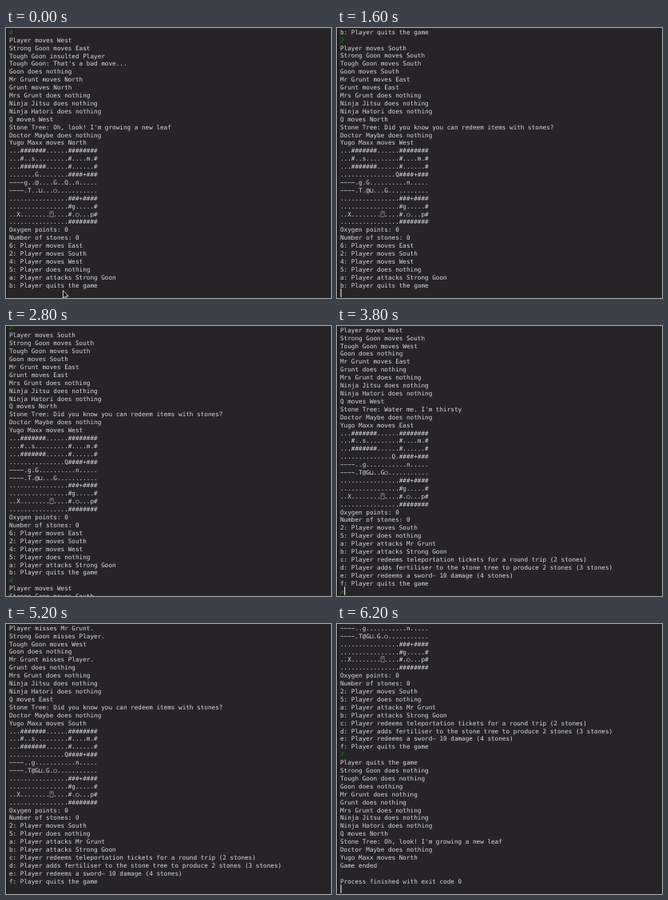
An HTML page that plays this animation: 407x338 px, repeating every 6.6 s.

```html
<!DOCTYPE html>
<html lang="en">
<head>
<meta charset="utf-8">
<title>Console game</title>
<style>
  html, body { margin: 0; width: 100%; height: 100%; overflow: hidden; background: #262427; }
  svg { display: block; }
  text {
    font: 7.66px "DejaVu Sans Mono", monospace;
    text-rendering: geometricPrecision;
    white-space: pre;
    fill: #dadada;
  }
  .input { fill: #06900c; font-style: italic; }
</style>
</head>
<body>
<svg width="407" height="338" viewBox="0 0 407 338">
  <rect width="1.4" height="338" fill="#151416"/>
  <g id="log"></g>
  <rect id="caret" width="1.2" height="10.6" fill="#d8d8d8"/>
  <path id="mouse" d="M71.5 328.6v9.4l2.1-1.9 1.6 3.4 1.5-.7-1.5-3.3h2.8z"
        fill="#0c0c0c" stroke="#e4e4e4" stroke-width=".9"/>
</svg>
<script>
const LOOP = 6600, LINE = 9.903, CHAR = 4.612, LEFT = 4, BASE = 7.8;
const LAST_ROW = 33; // screen row of the prompt
const GLIDE = 1.34;  // rows moved when a long output starts scrolling
const $ = id => document.getElementById(id);

const names = ['Player', 'Strong Goon', 'Tough Goon', 'Goon', 'Mr Grunt', 'Grunt', 'Mrs Grunt',
  'Ninja Jitsu', 'Ninja Hatori', 'Q', 'Stone Tree', 'Doctor Maybe', 'Yugo Maxx'];
const verbs = { N: ' moves North', S: ' moves South', E: ' moves East', W: ' moves West', '-': ' does nothing' };
const leaf = ": Oh, look! I'm growing a new leaf";
const redeem = ': Did you know you can redeem items with stones?';

// One entry per character: a key of verbs or the literal rest of the line.
const actions = list => list.map((a, i) => names[i] + (verbs[a] || a));

const map = (gate, water, pool) => [
  '...#######......########',
  '...#..s.........#....m.#',
  '...#######......#......#',
  gate + '####+###',
  '~~~~' + water,
  '~~~~' + pool,
  '................###+####',
  '................#g.....#',
  '..X........⍞....#.○...p#',
  '................########',
  'Oxygen points: 0',
  'Number of stones: 0'
];

const menu = list => list.map(s => s.replace(':', ': Player'));
const walkMenu = menu(['6: moves East', '2: moves South', '4: moves West', '5: does nothing',
  'a: attacks Strong Goon', 'b: quits the game']);
const fightMenu = menu(['2: moves South', '5: does nothing', 'a: attacks Mr Grunt', 'b: attacks Strong Goon',
  'c: redeems teleportation tickets for a round trip (2 stones)',
  'd: adds fertiliser to the stone tree to produce 2 stones (3 stones)',
  'e: redeems a sword– 10 damage (4 stones)', 'f: quits the game']);

const first = actions(['W', 'E', ' insulted Player', '-', 'N', 'N', '-', '-', '-', 'W', leaf, '-', 'N']);
first.splice(3, 0, "Tough Goon: That's a bad move...");

const lines = [
  '4', ...first,
  ...map('.......G........', 'g..@....G..Q..n.....', '.T..⊔...○...........'), ...walkMenu,
  '2', ...actions(['S', 'S', 'S', 'S', 'E', 'E', '-', '-', '-', 'N', redeem, '-', 'W']),
  ...map('...............Q', '.g.G..........n.....', '.T.@⊔...G...........'), ...walkMenu,
  '4', ...actions(['W', 'S', 'W', '-', 'E', '-', '-', '-', '-', 'W', ": Water me. I'm thirsty", '-', 'E']),
  ...map('..............Q.', '..g...........n.....', '.T@G⊔..G○...........'), ...fightMenu,
  'a', ...actions([' misses Mr Grunt.', ' misses Player.', 'W', '-', ' misses Player.', '-', '-', '-', '-',
    'E', redeem, '-', 'S']),
  ...map('...............Q', '..g...........n.....', '.T@G⊔.G.○...........'), ...fightMenu,
  'f', ...actions([' quits the game', '-', '-', '-', '-', '-', '-', '-', '-', 'N', leaf, '-', 'N']),
  'Game ended', '', 'Process finished with exit code 0'
];

const isInput = s => s.length === 1;
const prompts = lines.map((s, i) => isInput(s) ? i : 0).filter(Boolean).concat(lines.length);

const rows = lines.map((s, i) => {
  const row = document.createElementNS('http://www.w3.org/2000/svg', 'text');
  row.textContent = s;
  row.setAttribute('x', LEFT);
  row.setAttribute('y', BASE + i * LINE);
  if (isInput(s)) row.setAttribute('class', 'input');
  return $('log').appendChild(row);
});

// Times in ms; output is the first print, settle the end of its scroll.
const turns = [
  { key: 200, enter: 600, output: 800, settle: 800 },
  { key: 2600, enter: 2800, output: 2800, settle: 3000 },
  { key: 3800, enter: 4600, output: 4800, settle: 4800 },
  { key: 5800, enter: 5800, output: 6000, settle: 6200 }
];
const caretOff = [[0, 200], [1000, 1600], [2000, 2200], [4400, 4600], [5200, 5400]];

// Scroll position, caret line and number of typed characters.
function screenAt(t) {
  const i = turns.findLastIndex(turn => turn.key <= t);
  const at = (end, typed = 0, top = end - LAST_ROW) => ({ top, end, typed });
  if (i < 0) return at(prompts[0]);
  const { enter, output, settle } = turns[i];
  const now = prompts[i], next = prompts[i + 1];
  if (t < enter) return at(now, 1);
  if (t < output) return at(now + 1);
  if (t < settle) return at(next, 0, now - LAST_ROW + GLIDE);
  return at(next);
}

const show = (el, on) => { el.style.display = on ? '' : 'none'; };

function frame() {
  const t = performance.now() % LOOP;
  const { top, end, typed } = screenAt(t);
  $('log').setAttribute('transform', `translate(0 ${-top * LINE})`);
  rows.forEach((row, i) => show(row, i < end + typed));
  $('caret').setAttribute('x', LEFT + .4 + typed * CHAR);
  $('caret').setAttribute('y', (end - top) * LINE - .5);
  show($('caret'), !caretOff.some(([from, to]) => t >= from && t < to));
  show($('mouse'), t < turns[0].key);
  requestAnimationFrame(frame);
}
frame();
</script>
</body>
</html>
```
